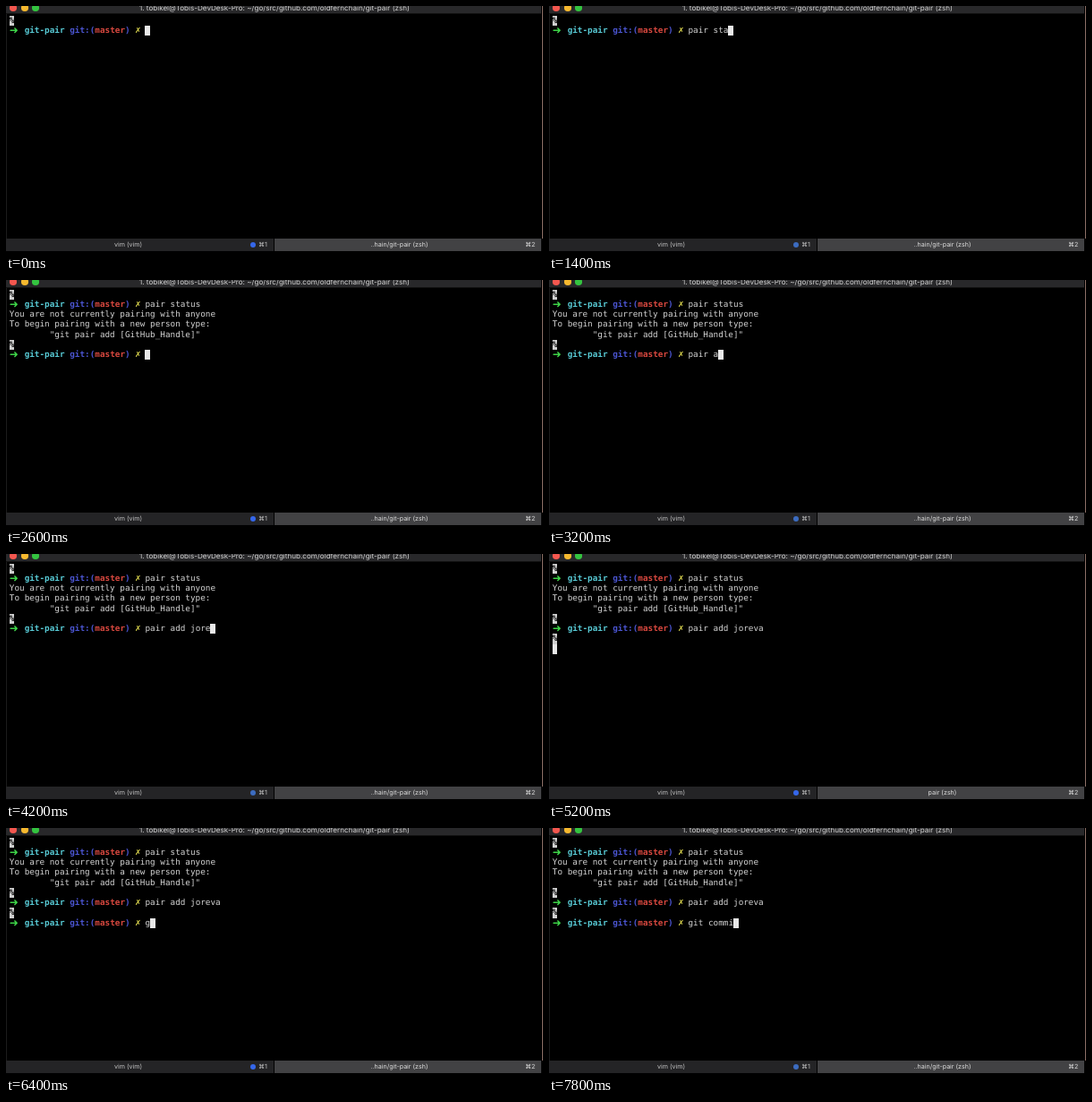
Recreate the animation shown at these times as an HTML page. Size 600x275 px, loop 8 s.

```html
<!DOCTYPE html>
<html lang="en">
<head>
<meta charset="utf-8">
<title>Terminal</title>
<style>
  html, body { margin: 0; width: 100%; height: 100%; overflow: hidden; background: #000; }
  #stage { position: relative; width: 600px; height: 275px; overflow: hidden; background: #000;
    font: 7.1px/10px Inter, Roboto, sans-serif; color: #c4c4c4; text-rendering: geometricPrecision; }
  #stage > * { position: absolute; white-space: pre; }
  #bar { left: 0; top: 0; width: 598px; height: 8px; background: #28282a; border-bottom: 1px solid #101010; }
  .light { top: -1.8px; width: 7.6px; height: 7.6px; border-radius: 50%; }
  #title { left: 0; top: -3.1px; width: 600px; text-align: center; font-size: 8.1px; color: #d2d2d2; }
  #term { left: 3.8px; top: 10.7px; margin: 0; color: #d4d4d4;
    font: 9.34px/11.25px "DejaVu Sans Mono", monospace; }
  #term b { display: inline-block; width: 5.62px; height: 11.25px; vertical-align: top; }
  #term i { font-style: normal; font-weight: bold; }
  #term .mark { background: #cfcfcf; color: #000; }
  #term .cursor { background: #e8e8e8; }
  #term .arrow { font: bold 12px/11.25px "DejaVu Sans", sans-serif; color: #3fd84a; }
  #term .cross { font-size: 10.5px; color: #e2dc50; }
  .tab { top: 260px; height: 14px; line-height: 14.5px; text-align: center; box-sizing: border-box; }
  .key { top: 262px; }
  #dot { left: 273px; top: 263.8px; width: 6px; height: 6px; border-radius: 50%; }
  #edge { left: 598.5px; top: 0; width: 1.5px; height: 260px; background: #8c6f66; }
  #side { left: 0; top: 9px; width: 1px; height: 251px; background: #1c1c1c; }
</style>
</head>
<body>
<div id="stage">
  <div id="bar"></div>
  <div class="light" style="left:4.4px;background:#f4574f"></div>
  <div class="light" style="left:17px;background:#f6b92f"></div>
  <div class="light" style="left:29.4px;background:#34c440"></div>
  <div id="title"></div>
  <pre id="term"></pre>
  <div id="side"></div>
  <div class="tab" style="left:0;width:299px;background:#242426;padding-right:26px">vim (vim)</div>
  <div class="tab" id="tab" style="left:300px;width:298px;background:#424244;color:#dedede;padding-right:20px;padding-left:1px"></div>
  <div id="dot"></div>
  <div class="key" style="left:282px">⌘1</div>
  <div class="key" style="left:580px;color:#dedede">⌘2</div>
  <div id="edge"></div>
</div>
<script>
const LOOP = 8000, STEP = 200;
const $ = id => document.getElementById(id);
const MARK = '<b class="mark">%</b>\n';
const CURSOR = '<b class="cursor"></b>';
const color = (c, s) => `<i style="color:${c}">${s}</i>`;
const PROMPT = '<b class="arrow">➜</b>  ' + color('#58cbd6', 'git-pair') + ' ' +
  color('#4b55d2', 'git:(') + color('#d8483f', 'master') + color('#4b55d2', ')') +
  ' <b class="cross">✗</b> ';
const HELP = 'You are not currently pairing with anyone\n' +
  'To begin pairing with a new person type:\n' +
  '        "git pair add [GitHub_Handle]"\n';
const HOME = '1. tobikel@Tobis-DevDesk-Pro: ~/go/src/github.com/oldfernchain/git-pair (zsh)';

// keys: [time, letters typed so far]; named: when the title shows the command
const commands = [
  { start: 0, text: 'pair status', keys: [[800, 1], [1000, 4], [1200, 6], [1400, 8], [1600, 11]],
    enter: 1800, done: 1800, output: HELP, named: 1800 },
  { start: 2600, text: 'pair add joreva',
    keys: [[2800, 2], [3000, 5], [3200, 6], [3400, 7], [3600, 9], [3800, 10], [4000, 11], [4200, 13], [4400, 14], [4800, 15]],
    enter: 5000, done: 5200, output: '', named: 5400 },
  { start: 6000, text: 'git commit', keys: [[6400, 1], [6600, 2], [6800, 4], [7000, 5], [7600, 7], [7800, 9]],
    enter: Infinity }
];
const dimSpans = [[1000, 1800], [2800, 5000], [6600, LOOP]];

function typed({ text, keys }, t) {
  const last = keys.filter(k => k[0] <= t).pop();
  return text.slice(0, last ? last[1] : 0);
}

function render(t) {
  let screen = MARK, title = HOME, tab = '..hain/git-pair (zsh)';
  commands.forEach((cmd, i) => {
    if (t < cmd.start) return;
    screen += PROMPT + typed(cmd, t);
    if (t < cmd.enter) return;
    screen += '\n';
    if (t >= cmd.done) screen += cmd.output + MARK;
    if (t < commands[i + 1].start) {
      tab = 'pair (zsh)';
      if (t >= cmd.named) title = `1. git${cmd.text} (zsh)`;
    }
  });
  $('term').innerHTML = screen + CURSOR;
  $('title').textContent = title;
  $('tab').textContent = tab;
  const dim = dimSpans.some(([from, to]) => t >= from && t < to);
  $('dot').style.background = dim ? '#3c6cc0' : '#3567ea';
}

let shown = -1;
function tick() {
  const t = Math.floor(performance.now() % LOOP / STEP) * STEP;
  if (t !== shown) render(shown = t);
  requestAnimationFrame(tick);
}
tick();
</script>
</body>
</html>
```
